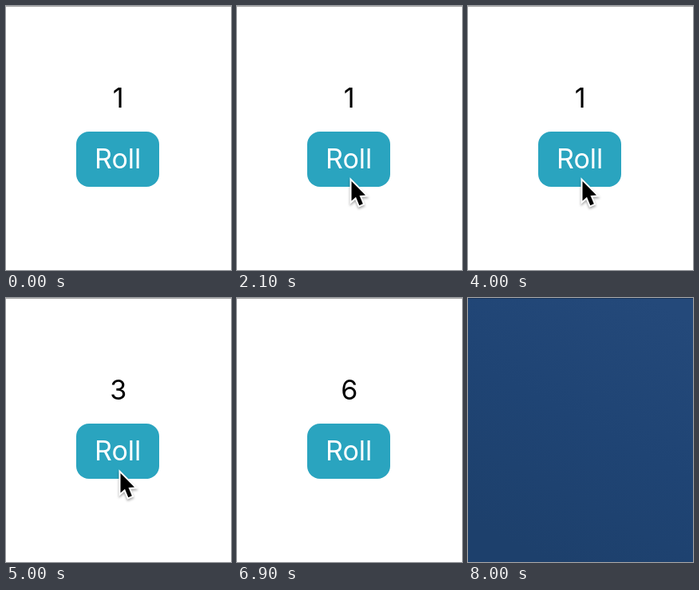
An HTML page that plays this animation: 282 px wide and 330 px high, repeating every 8.5 s.

```html
<!DOCTYPE html>
<html lang="en">
<head>
<meta charset="utf-8">
<title>Roll</title>
<style>
  html, body { margin: 0; width: 100%; height: 100%; overflow: hidden; background: #fff; }
  svg { display: block; width: 100vw; height: 100vh; }
  text { font: 400 34px Inter, Roboto, sans-serif; text-anchor: middle; }
  #cursor { filter: drop-shadow(0 2px 1.5px rgba(0, 0, 0, .35)); }
  .scene { animation: 8500ms step-end infinite; }
  #dark { animation-name: dark; }
  #blue { animation-name: blue; }
  /* 7900 ms and 8000 ms of the loop */
  @keyframes dark { 0% { opacity: 0 } 92.9412% { opacity: 1 } 94.1176%, 100% { opacity: 0 } }
  @keyframes blue { 0% { opacity: 0 } 94.1176%, 100% { opacity: 1 } }
</style>
</head>
<body>
<svg viewBox="0 0 282 330">
  <defs>
    <linearGradient id="sky" x1="0.8" y1="0" x2="0.35" y2="1">
      <stop offset="0" stop-color="#24497a"/>
      <stop offset=".5" stop-color="#1f4474"/>
      <stop offset="1" stop-color="#1d406c"/>
    </linearGradient>
  </defs>

  <rect width="282" height="330" fill="#fff"/>
  <rect width="282" height="1" fill="#a6a6a6"/>
  <text id="number" x="140.7" y="126.5">1</text>
  <g id="button">
    <rect x="88" y="157" width="104" height="69" rx="16" fill="#2aa4bf"/>
    <text x="140.2" y="203.3" fill="#fff">Roll</text>
  </g>
  <g id="cursor" visibility="hidden">
    <path d="M143.5 219V243.5L149 238.7L153.3 249.2L157.8 247.3L153.5 237.1L161 236.6Z"
          stroke="#fff" stroke-width="4" paint-order="stroke"/>
  </g>

  <g id="dark" class="scene" opacity="0">
    <rect width="282" height="330" fill="#222529"/>
    <rect width="282" height="1" fill="#17181a"/>
  </g>
  <g id="blue" class="scene" opacity="0">
    <rect width="282" height="330" fill="url(#sky)"/>
    <rect width="282" height="1" fill="#17345a"/>
  </g>
</svg>

<script>
  const LOOP = 8500, STEP = 100, DIM = 0.2;
  const presses = [
    { down: 2500, up: 2800, end: 3000, value: 4 },
    { down: 3500, up: 3800, end: 4000, value: 1 },
    { down: 4600, up: 4800, end: 5000, value: 3 },
    { down: 5600, up: 6000, end: 6200, value: 6 }
  ];
  const enter = { from: 1600, to: 2100, leave: 6400, dx: 4, dy: 95 };

  const [number, button, cursor] = ['number', 'button', 'cursor']
    .map(id => document.getElementById(id));
  const clamp = u => Math.min(1, Math.max(0, u));
  const easeInOut = u => u < 0.5 ? 2 * u * u : 1 - 2 * (1 - u) ** 2;

  function buttonOpacity(t) {
    const press = presses.find(p => t >= p.down && t <= p.end);
    if (!press) return 1;
    const { down, up, end } = press;
    return t < up
      ? 1 - (1 - DIM) * easeInOut((t - down + STEP) / (up - down))
      : DIM + (1 - DIM) * easeInOut((t - up + STEP) / (end - up + STEP));
  }

  function render(time) {
    const t = Math.floor((time % LOOP) / STEP) * STEP;

    const value = presses.reduce((last, p) => t >= p.up ? p.value : last, 1);
    if (number.textContent !== String(value)) number.textContent = value;
    button.setAttribute('opacity', buttonOpacity(t));

    const away = (1 - clamp((t - enter.from) / (enter.to - enter.from))) ** 2;
    const shown = t >= enter.from && t < enter.leave;
    cursor.setAttribute('visibility', shown ? 'visible' : 'hidden');
    cursor.setAttribute('transform', `translate(${enter.dx * away} ${enter.dy * away})`);
  }

  let start;
  function tick(now) {
    start ??= now;
    render(now - start);
    requestAnimationFrame(tick);
  }
  requestAnimationFrame(tick);
</script>
</body>
</html>
```
